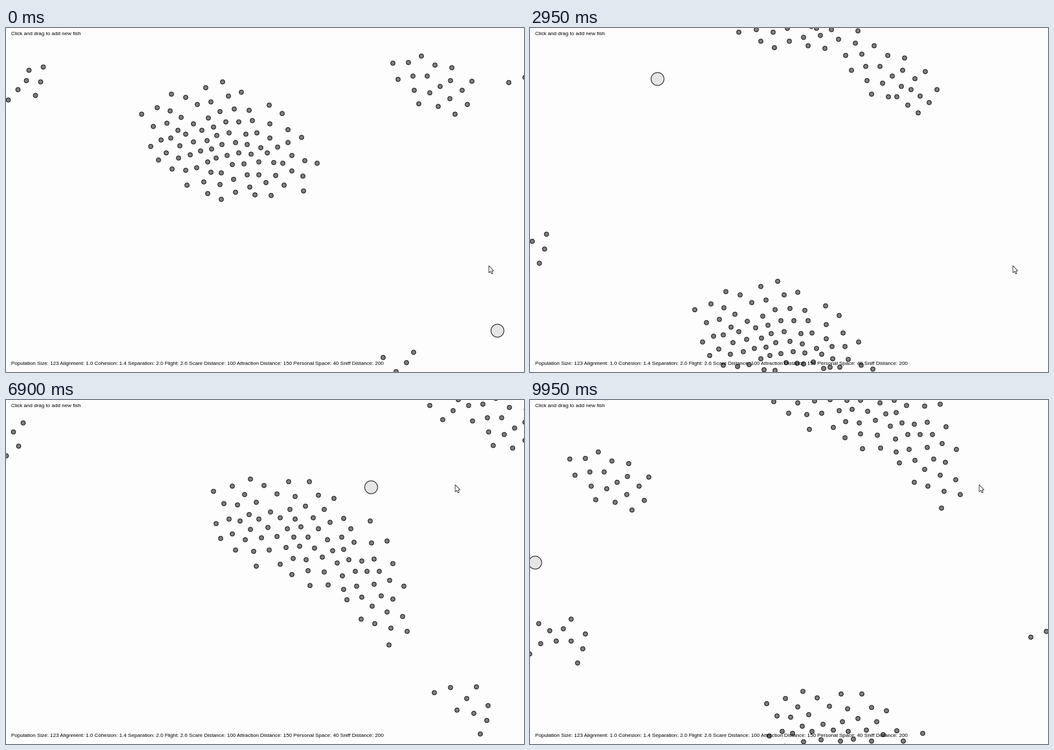
Recreate the animation shown at these times as a matplotlib script. Size 800 px wide and 533 px high, loop 10000 ms.

```python
import numpy as np
import matplotlib.pyplot as plt
from matplotlib.animation import FuncAnimation
from matplotlib.patches import Circle, Polygon

W, H, DPI = 800, 533, 100
FRAMES, INTERVAL = 200, 50
PX = 72 / DPI
FISH_MARGIN, SHARK_MARGIN = 4, 10
WORLD = np.array([W, H])
PERIOD = WORLD + 2 * FISH_MARGIN
GOLDEN = (5 ** 0.5 - 1) / 2
MAIN_SIZE = 91


def path(*keys):
    """Smooth Hermite curve through (time, x, y) keys, one row per frame."""
    keys = np.array(keys, float)
    times, points = keys[:, 0], keys[:, 1:]
    slope = np.gradient(points, times, axis=0)
    t = np.arange(FRAMES)
    i = np.clip(np.searchsorted(times, t, side="right") - 1, 0, len(times) - 2)
    span = (times[i + 1] - times[i])[:, None]
    s = (t - times[i])[:, None] / span
    return ((2 * s**3 - 3 * s**2 + 1) * points[i] + (3 * s**2 - 2 * s**3) * points[i + 1]
            + span * ((s**3 - 2 * s**2 + s) * slope[i] + (s**3 - s**2) * slope[i + 1]))


def wrap(p, margin):
    return (p + margin) % (WORLD + 2 * margin) - margin


def ease(t, start, end):
    s = np.clip((t - start) / (end - start), 0, 1)
    return s * s * (3 - 2 * s)


def oval(n, length, width, tilt):
    """Sunflower layout of n fish inside a tilted ellipse."""
    k = np.arange(n)
    r = np.sqrt((k + 0.5) / n)
    angle = 2 * np.pi * GOLDEN * k
    x, y = length * r * np.cos(angle), width * r * np.sin(angle)
    c, s = np.cos(np.radians(tilt)), np.sin(np.radians(tilt))
    return np.column_stack([c * x - s * y, s * x + c * y])


# Small schools drift along a path (unwrapped coordinates) and keep their shape.
east = path((0, 660, 85), (25, 598, 140), (59, 550, 70), (83, 600, 45),
            (138, 775, 38), (199, 932, 122))
chasers = path((0, 815, 90), (25, 735, 144), (59, 601, 109), (83, 667, 40),
               (138, 700, -82), (199, 812, -168))
south = path((0, 602, -24), (25, 516, -40), (83, 440, 13), (138, 674, 15), (199, 844, -187))
edge = path((0, 852, 82), (83, 802, 419), (138, 732, 495), (199, 880, 384))
SCHOOLS = [(east, oval(19, 72, 40, 25)), (chasers, oval(5, 42, 28, 15)),
           (south, oval(4, 44, 16, 0)), (edge, oval(4, 18, 26, 0))]

shark_track = wrap(path((0, 759, 469), (25, 871, 570), (59, 1017, 632), (83, 1130, 640),
                        (175, 1547, 750), (199, 1648, 805)), SHARK_MARGIN)

rng = np.random.default_rng(5)
order = (np.arange(MAIN_SIZE) + 0.5) / MAIN_SIZE
side = (np.arange(MAIN_SIZE) * GOLDEN % 1) * 2 - 1
side = np.sign(side) * np.abs(side) ** 1.2
jitter = rng.normal(0, 4, (MAIN_SIZE, 2))
# Fish in the core of the main school tolerate closer neighbours.
core = np.maximum(np.abs(side), np.abs(2 * order - 1))
space = np.concatenate([18 + 9 * core] + [np.full(len(shape), 26) for _, shape in SCHOOLS])


def main_school(t):
    """Round at first, then trailing a bent tail; fills a curved spine by area."""
    center = np.array([325 + 0.73 * t, 175 - 4.15 * t + 0.002 * t * t])
    s = ease(t, 40, 130)
    start = center + [-105, 0]
    bend = center + [15 + 135 * s, -35 + 35 * s]
    end = center + [140 + 30 * s, 65 + 130 * s]

    u = np.linspace(0, 1, 80)[:, None]
    spine = (1 - u)**2 * start + 2 * u * (1 - u) * bend + u**2 * end
    d = np.gradient(spine, axis=0)
    speed = np.hypot(d[:, 0], d[:, 1])
    normal = np.column_stack([-d[:, 1], d[:, 0]]) / speed[:, None]
    half = (88 - 14 * s) * np.sin(np.pi * (0.13 + 0.78 * u[:, 0] ** (1 - 0.4 * s)))

    area = np.cumsum(speed * half)
    at = np.interp(order, (area - area[0]) / (area[-1] - area[0]), u[:, 0])
    pick = lambda column: np.interp(at, u[:, 0], column)
    middle = np.column_stack([pick(spine[:, 0]), pick(spine[:, 1])])
    across = np.column_stack([pick(half * normal[:, 0]), pick(half * normal[:, 1])])
    return middle + across * side[:, None] + jitter


def steer(p, goal, shark):
    """Pull to the goal, keep personal space, flee the shark."""
    gap = p[:, None] - p[None]
    gap -= PERIOD * np.round(gap / PERIOD)
    dist = np.hypot(gap[..., 0], gap[..., 1])
    np.fill_diagonal(dist, 1e9)
    room = (space[:, None] + space[None]) / 2
    push = np.clip(room - dist, 0, None) / np.maximum(dist, 1)
    away = wrap(p, FISH_MARGIN) - shark
    far = np.hypot(away[:, 0], away[:, 1])[:, None]
    fear = np.clip(42 - far, 0, None) / np.maximum(far, 1)
    return (0.12 * (goal - p) + 0.08 * (push[..., None] * gap).sum(1)
            + 0.3 * fear * away)


def swim():
    goals = np.array([np.concatenate([main_school(t)] + [c[t] + shape for c, shape in SCHOOLS])
                      for t in range(FRAMES)])
    p = goals[0].copy()
    for _ in range(80):
        p += steer(p, goals[0], shark_track[0])
    track = [p.copy()]
    for t in range(1, FRAMES):
        p += goals[t] - goals[t - 1]
        p += steer(p, goals[t], shark_track[t])
        track.append(p.copy())
    return wrap(np.array(track), FISH_MARGIN)


def pointer_at(t):
    return np.array([745.8, 368.3]) - np.array([52, 237]) * ease(t, 105, 117)


fish_track = swim()
ARROW = np.array([[0, 0], [0, 11], [2.5, 8.8], [4.3, 12.6], [6, 11.9], [4.4, 8.2], [7.4, 7.9]])

fig = plt.figure(figsize=(W / DPI, H / DPI), dpi=DPI, facecolor="#fefdfe")
ax = fig.add_axes([0, 0, 1, 1])
ax.set_xlim(0, W)
ax.set_ylim(H, 0)
ax.axis("off")

fish = ax.scatter(*fish_track[0].T, s=(6.7 * PX) ** 2, c="#7f7f7f",
                  edgecolors="#101010", linewidths=PX, zorder=2)
shark = ax.add_patch(Circle(shark_track[0], 10, fc="#e5e5e5", ec="#101010", lw=PX, zorder=3))
pointer = ax.add_patch(Polygon(ARROW + pointer_at(0), fc="white", ec="#303030",
                               lw=0.9 * PX, zorder=5))


def label(y, text):
    ax.text(8, y, text, family="Liberation Sans", size=8 * PX, color="black",
            va="baseline", zorder=4)


label(10.6, "Click and drag to add new fish")
label(522.4, "Population Size: 123 Alignment: 1.0 Cohesion: 1.4 Separation: 2.0 "
             "Flight: 2.6 Scare Distance: 100 Attraction Distance: 150 "
             "Personal Space: 40 Sniff Distance: 200")


def draw(t):
    fish.set_offsets(fish_track[t])
    shark.center = shark_track[t]
    pointer.set_xy(ARROW + pointer_at(t))
    return fish, shark, pointer


anim = FuncAnimation(fig, draw, frames=FRAMES, interval=INTERVAL, repeat=True,
                     repeat_delay=0, blit=False)
plt.show()
```
